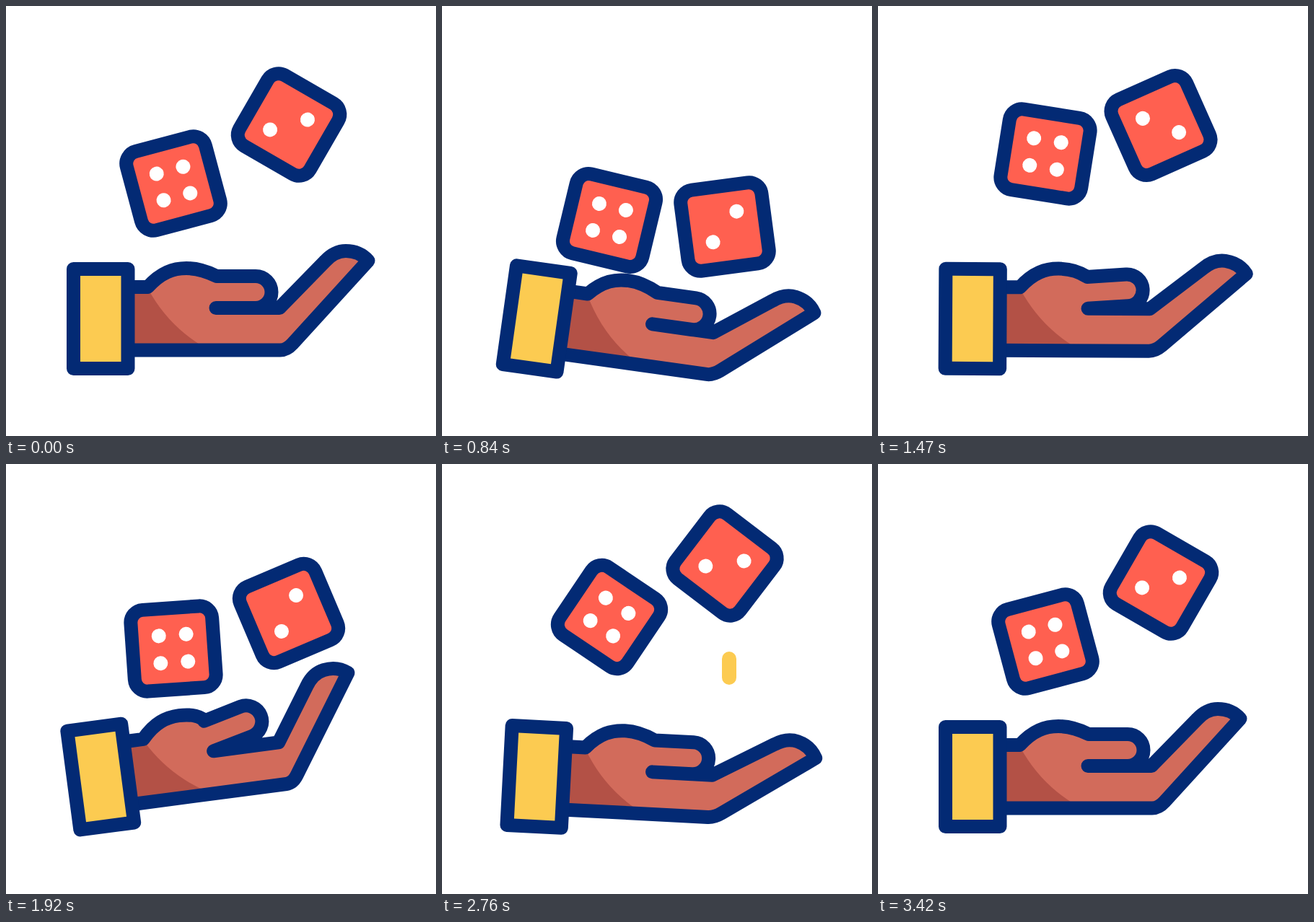
An HTML page for the animation above (3600 ms loop, 596 by 596 pixels).

```html
<!DOCTYPE html>
<html>
<head>
<meta charset="utf-8">
<style>
  html, body { margin: 0; width: 100%; height: 100%; overflow: hidden; background: #fff; }
  svg { display: block; width: 100vw; height: 100vh; }
  .line { stroke: #032a74; stroke-width: 19; stroke-linejoin: round; stroke-linecap: round; }
</style>
</head>
<body>
<svg viewBox="0 0 596 596">
  <path id="spark" stroke="#fccb51" stroke-width="20" stroke-linecap="round"/>
  <g id="hand">
    <path id="skin" fill="#d26b5b"/>
    <path fill="#b35146" d="M170 390H196L202 401Q228 444 270 470H170Z"/>
    <path id="outline" class="line" fill="none"/>
    <rect class="line" x="93.5" y="364.5" width="75.5" height="138" fill="#fccb51"/>
  </g>
  <g id="four"></g>
  <g id="two"></g>
</svg>
<script>
const LOOP = 3600, STEP = 30;
const $ = id => document.getElementById(id);

// Keys are [time, value] pairs.
const tracks = {
  hand: [[300, 0], [840, 8], [900, 9.6], [1170, -6], [1470, 0.3], [1660, 7.8], [1920, -7.5],
         [2280, 4.3], [2490, 5.8], [2760, 3], [3030, 0.4], [3420, 0]],
  bend: [[300, 0], [840, 9.3], [900, 10.5], [1170, -8], [1470, 8], [1660, 9], [1920, -9.5],
         [2280, -6.5], [2460, 3], [2760, 16.5], [3000, 5], [3420, 0]],
  thumb: [[840, 0], [900, 0], [1170, -13], [1470, -4], [1660, 0], [1950, -14.5],
          [2280, -12.5], [2550, 0], [3420, 0]],
  fourY: [[300, 246], [480, 208], [840, 297], [900, 303], [1170, 258], [1470, 205], [1510, 203],
          [1690, 296], [1920, 256], [2090, 206], [2280, 263], [2490, 298], [2760, 212],
          [2850, 200], [3000, 216], [3420, 246]],
  fourTurn: [[300, -15], [840, -166.5], [1470, -261], [1920, -364], [2280, -484],
             [2760, -596], [3420, -645]],
  twoY: [[300, 164.5], [480, 123], [840, 306], [900, 312], [1170, 250], [1380, 188], [1470, 165.5],
         [1510, 163], [1690, 290], [1920, 207], [2090, 138], [2280, 188], [2490, 290],
         [2760, 138], [2850, 121], [3000, 138], [3420, 164.5]],
  twoTurn: [[300, 30], [840, 172.5], [1470, 246], [1920, 337], [2280, 453.4],
            [2760, 577.4], [3420, 570]],
  pips: [[2190, 1], [2280, 0.89], [2370, 1]],
  head: [[2640, 325], [2760, 270], [2850, 255]],
  tail: [[2640, 325], [2760, 296], [2850, 255]]
};

// Smooth curve through the keys that never overshoots them.
function at(name, t) {
  const k = tracks[name], last = k.length - 1;
  if (t <= k[0][0]) return k[0][1];
  if (t >= k[last][0]) return k[last][1];
  const slope = i => (k[i + 1][1] - k[i][1]) / (k[i + 1][0] - k[i][0]);
  const tangent = i => {
    if (i === 0 || i === last) return 0;
    const a = slope(i - 1), b = slope(i);
    return a * b > 0 ? 2 * a * b / (a + b) : 0;
  };
  const i = k.findIndex(p => p[0] > t) - 1;
  const [t0, v0] = k[i], [t1, v1] = k[i + 1];
  const d = t1 - t0, u = (t - t0) / d, w = 1 - u;
  return v0 * w * w * (1 + 2 * u) + v1 * u * u * (3 - 2 * u)
    + d * u * w * (tangent(i) * w - tangent(i + 1) * u);
}

function turner(cx, cy, deg) {
  const a = deg * Math.PI / 180, c = Math.cos(a), s = Math.sin(a);
  return (x, y) => [cx + (x - cx) * c - (y - cy) * s, cy + (x - cx) * s + (y - cy) * c];
}

function handPath(bend, thumb) {
  const f = turner(390, 418, bend), h = turner(292, 410, thumb);
  const tip = f(502, 353), heel = 389 - 0.55 * bend;
  const dx = tip[0] - heel, dy = tip[1] - 477, n = 12 / Math.hypot(dx, dy);
  return `M169 389.5H196.5C215 369 232 363.5 250 363.5
    C268 363.5 281 369 ${h(292, 374.5)}
    L${h(346, 374.5)}A22 22 0 0 1 ${h(346, 418.5)}
    L291 418.5H${379 - 0.3 * bend}L${f(442, 354)}
    C${f(452, 343)} ${f(461, 339.5)} ${f(471, 339.5)}
    C${f(483, 339.5)} ${f(494, 344)} ${tip}
    L${heel + dx * n} ${477 + dy * n}Q${heel} 477 ${heel - 9} 477H169`;
}

function buildDie(id, spots) {
  $(id).innerHTML = `<rect class="line" x="-56.5" y="-56.5" width="113" height="113" rx="17.5" fill="#ff6050"/>
    <g fill="#fff">${spots.map(([x, y]) => `<circle cx="${x * 19}" cy="${y * 19}" r="10"/>`).join("")}</g>`;
}

function placeDie(id, x, t) {
  $(id).setAttribute("transform", `translate(${x} ${at(id + "Y", t)}) rotate(${at(id + "Turn", t)})`);
  $(id).lastElementChild.setAttribute("opacity", at("pips", t));
}

function draw(now) {
  const t = Math.floor(now % LOOP / STEP) * STEP;
  const d = handPath(at("bend", t), at("thumb", t));
  $("skin").setAttribute("d", d);
  $("outline").setAttribute("d", d);
  $("hand").setAttribute("transform", `rotate(${at("hand", t)} 131.5 433.5)`);
  placeDie("four", 232, t);
  placeDie("two", 392, t);
  const shown = t > 2640 && t < 2850;
  $("spark").setAttribute("d", shown ? `M398 ${at("head", t)}V${at("tail", t)}` : "");
}

buildDie("four", [[-1, -1], [1, -1], [-1, 1], [1, 1]]);
buildDie("two", [[1, -1], [-1, 1]]);

const start = performance.now();
function loop() {
  draw(performance.now() - start);
  requestAnimationFrame(loop);
}
loop();
</script>
</body>
</html>
```
